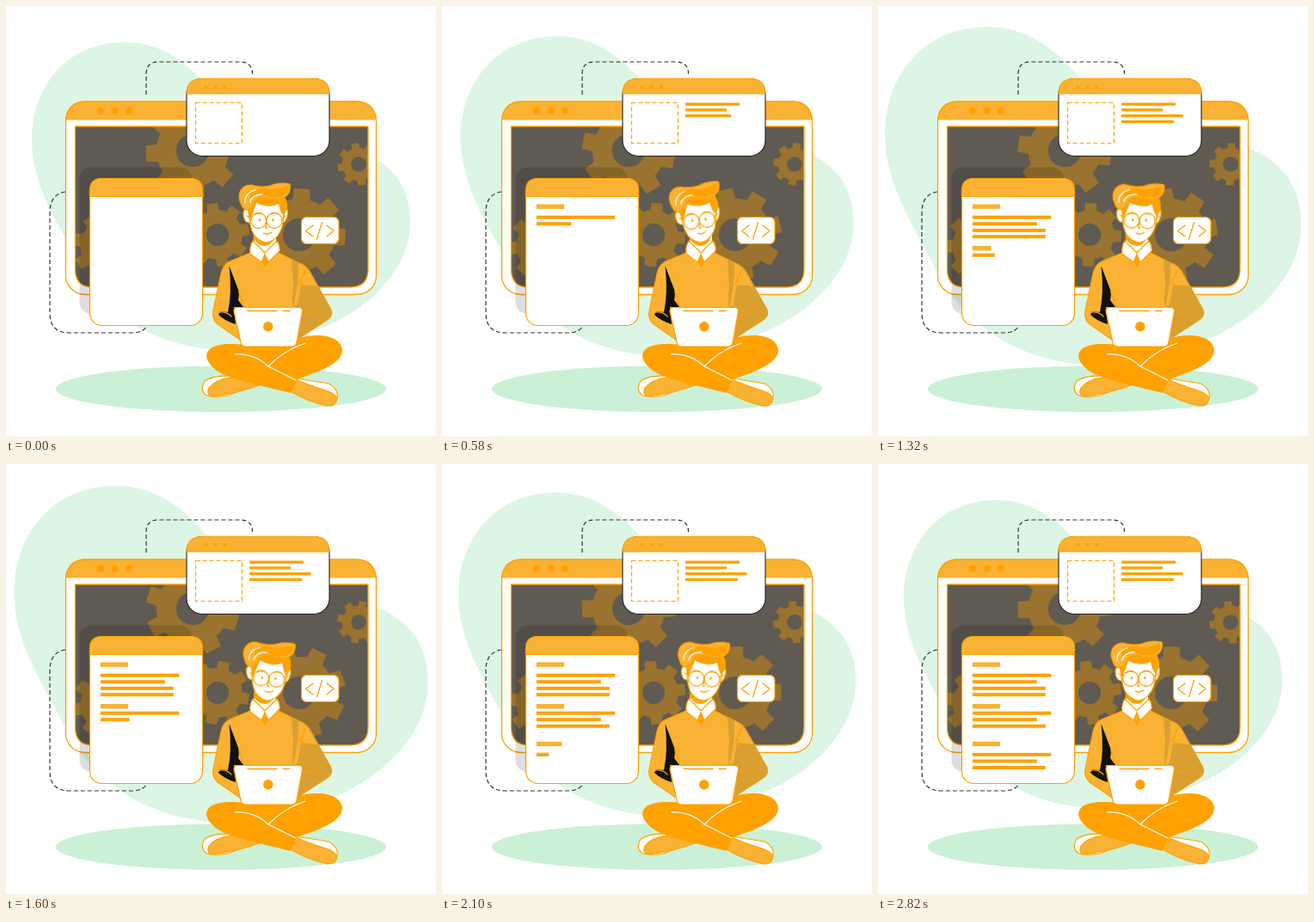
An HTML page for the animation above (2.84 s loop, 500 by 500 pixels).

```html
<!DOCTYPE html>
<html lang="en">
<head>
<meta charset="utf-8">
<title>Developer at work</title>
<style>
  html, body { margin: 0; width: 100%; height: 100%; overflow: hidden; background: #fff; }
  svg { display: block; width: 100vw; height: 100vh; }
  .o { fill: #ffa100; }
  .y { fill: #f9b233; }
  .w { fill: #fff; }
  .d { fill: #d99f31; }
  .line { fill: none; stroke: #ffa100; stroke-width: 1.3; stroke-linecap: round; stroke-linejoin: round; }
  .edge { stroke: #ffa100; stroke-width: 1.2; stroke-linejoin: round; }
  .light { fill: none; stroke: #fff; stroke-width: 1.3; stroke-linecap: round; }
  .dash { fill: none; stroke: #333; stroke-width: 1.2; stroke-dasharray: 5 3; }
  #blob { transform-origin: 250px 220px; animation: swell 2840ms cubic-bezier(.37, 0, .63, 1) infinite; }
  #head { transform-origin: 301px 284px; animation: nod 2840ms cubic-bezier(.37, 0, .63, 1) infinite; }
  .gear { animation: spin 2840ms linear infinite; }
  .back { animation-direction: reverse; }
  .bar { transform-box: fill-box; transform-origin: 0 0; transform: scaleX(0); }
  @keyframes swell { 47.9% { transform: scale(1.1); } }
  @keyframes nod {
    0%, 96% { transform: rotate(0deg); }
    20.5% { transform: rotate(-6.3deg); }
    59.8% { transform: rotate(4.8deg); }
  }
  @keyframes spin { to { transform: rotate(360deg); } }
</style>
</head>
<body>
<svg viewBox="0 0 500 500">
  <defs>
    <clipPath id="screen"><path d="M80.5 140H421V306Q421 327 400 327H101Q80.5 327 80.5 306Z"/></clipPath>
  </defs>

  <path id="blob" fill="#ddf5e4" d="M138 42C70 42 30 95 30 155C30 210 62 255 85 300C110 350 165 398 255 400C310 400 345 385 375 371C415 354 470 310 470 251C470 215 455 191 425 175C380 154 290 150 243 104C215 70 185 42 138 42Z"/>
  <ellipse cx="250" cy="445.3" rx="192" ry="26.8" fill="#caf1d6"/>

  <path class="dash" d="M163 103V79Q163 65 177 65H272Q286.500 65 286.500 79"/>
  <path class="dash" d="M69 216Q51 219 51 240V357Q51 380 74 380H149Q160 379 164 372"/>

  <!-- monitor -->
  <rect class="w" x="69.500" y="111" width="361" height="224.500" rx="22"/>
  <path class="y" d="M69.500 132.500Q70 111 92 111H408Q430 111 430.500 132.500Z"/>
  <rect class="line" x="69.500" y="111" width="361" height="224.500" rx="22"/>
  <g class="o">
    <circle cx="110" cy="121.700" r="4.100"/><circle cx="126.600" cy="121.700" r="4.100"/><circle cx="143" cy="121.700" r="4.100"/>
  </g>
  <g clip-path="url(#screen)">
    <rect x="80" y="139" width="342" height="189" fill="#5f5a52"/>
    <g id="gears" fill="#99732f"></g>
  </g>
  <path class="line" d="M80.500 140H421V306Q421 327 400 327H101Q80.500 327 80.500 306Z"/>
  <rect x="85.500" y="187.500" width="130.500" height="170.500" rx="14" opacity=".13"/>

  <!-- small window -->
  <rect class="w" x="210" y="84.500" width="166" height="90" rx="18" stroke="#222" stroke-width="1.1"/>
  <path class="y edge" d="M210 102Q210 84.500 228 84.500H358Q376 84.500 376 102Z"/>
  <g class="o">
    <circle cx="232.500" cy="94" r="2.200"/><circle cx="243.500" cy="94" r="2.200"/><circle cx="254.500" cy="94" r="2.200"/>
  </g>
  <rect class="line" x="220.500" y="112.500" width="54" height="47" style="stroke-dasharray:5 3;stroke-linecap:butt;stroke-width:1.200"/>

  <!-- document window -->
  <rect class="w edge" x="97.500" y="200.500" width="131" height="171" rx="14"/>
  <path class="y edge" d="M97.500 221.500V214.500Q97.500 200.500 111.500 200.500H214.500Q228.500 200.500 228.500 214.500V221.500Z"/>
  <g id="bars"></g>

  <!-- code tag -->
  <rect class="w edge" x="343.500" y="245.500" width="43.500" height="31" rx="6"/>
  <path class="line" d="M357 255L348.500 261.500L357 268M373 255L381 261.500L373 268M367.500 251.500L361.500 271"/>

  <!-- legs and shoes -->
  <path class="w edge" d="M264 430Q241 429 231 436Q225 446 232 452Q240 456 258 453L290 440Z"/>
  <path class="y edge" d="M262 432Q244 434 236 444Q233 451 238 453.500Q262 453 300 439L285 430Z"/>
  <path class="w edge" d="M337 433L375 439Q387 445 385 456L372 459L330 446Z"/>
  <path class="y edge" d="M337 434Q352 441 372 447Q384 451 385 457Q383 465 374 465Q350 460 331 448Z"/>
  <path class="o" d="M266 393C242 392 230 399 234 411C241 427 262 433 290 440L331 450L338 434C366 425 391 415 391 400C390 384 365 379 340 386L320 396Z"/>
  <path class="light" d="M267 405Q289 404 305 419L337 435M348 392Q322 401 305 419"/>

  <!-- sweater -->
  <path class="y edge" d="M284 287L260 297Q252 301 250 311L241 354Q239 363 246 370L272 388H338L372 366Q381 361 378 353L354 310Q350 302 339 298L317 287Z"/>
  <path class="d" d="M332 294L340 298Q350 302 354 310L378 353Q381 361 372 366L340 387L345 352H334Q332 340 334 325Z"/>
  <path class="y" d="M340 299Q350 303 353 310L362 326L343 324L339 348L334 350Q341 320 340 299Z"/>
  <path class="line" d="M349 306L341 323M343 320L347 329M339 360Q354 359 361 354"/>
  <path fill="#111" d="M259.500 302L269 327Q272 333 270 342L276 350H265L267 370Q254 366 247 359L249 355L258 356Q263 334 259.500 302Z"/>
  <path class="line" d="M248 356Q257 355 262 361M271 333L277 350"/>

  <!-- neck, head, collar -->
  <path class="w" d="M289 262H314V280L301 292L288 280Z"/>
  <path class="o" d="M288 266L313 268Q309 279 301 279Q293 278 288 271Z"/>
  <g id="head">
    <path class="w edge" d="M283 237Q276 234 276 242Q277 253 284 252ZM322 236Q328 233 327.500 242Q326 252 321 252Z"/>
    <path class="w edge" d="M282 228Q282 258 289 267Q296 275 303 275Q312 274 318 264Q324 254 324 226Z"/>
    <path class="o" d="M273 227Q272 236 281 238L284 248L288 238L291 229Q307 236 317 230L319 238L323 245L327 235Q328 227 323 220L284 216Z"/>
    <path class="y edge" d="M276 235Q268 223 273 214Q279 206 289 209Q302 212 313 207Q323 205 330 207Q332 218 323 223Q313 227 301 222Q291 221 288 230Q286 235 281 237Z"/>
    <path class="o" d="M284 217Q291 210 304 213Q317 214 328 208Q330 217 321 221Q311 225 301 220Q290 217 284 226Z"/>
    <path class="light" d="M278 229Q277 218 290 214M284 228Q286 219 298 219"/>
    <circle class="line" cx="293.700" cy="249.500" r="9"/>
    <circle class="line" cx="312" cy="249.500" r="9"/>
    <path class="line" d="M285 247L280 244M320.500 247L325 244M289 243Q293 240 297 242M308 242Q312 239 316 242M303 251L302 258H304M299.500 264Q304 267 309 263"/>
    <ellipse class="o" cx="295" cy="248.800" rx="1.200" ry="1.800"/>
    <ellipse class="o" cx="310.500" cy="248.800" rx="1.200" ry="1.800"/>
  </g>
  <path class="w edge" d="M287 273L301 287L315 273Q319 279 318 285L305 298L301 289L297 298L284 288Q283 279 287 273Z"/>
  <path class="o" d="M301 287L304.500 299L301 304L298 299Z"/>

  <!-- laptop -->
  <path class="w edge" d="M265 355Q265 350.500 270 350.500H340Q345 350.500 344.500 355L338 391Q337 396 332 396H279Q274 396 273 391Z"/>
  <path class="line" d="M281 354.500H315M322 354.500H330"/>
  <circle class="o" cx="304.800" cy="372.700" r="5.700"/>
</svg>
<script>
  const LOOP = 2840;

  function add(parent, name, attrs) {
    const el = document.createElementNS('http://www.w3.org/2000/svg', name);
    for (const key in attrs) el.setAttribute(key, attrs[key]);
    return document.getElementById(parent).appendChild(el);
  }

  // Eight-toothed wheel with a round hole; phase is the angle of one tooth.
  function gearPath(R, phase) {
    const root = R * 0.77, hole = R * 0.35;
    const at = (r, deg) => {
      const a = deg * Math.PI / 180;
      return (r * Math.cos(a)).toFixed(2) + ' ' + (r * Math.sin(a)).toFixed(2);
    };
    let d = '';
    for (let i = 0; i < 8; i++) {
      const a = phase + i * 45;
      d += (i ? `A${root} ${root} 0 0 1 ` : 'M') + at(root, a - 14);
      d += `L${at(R, a - 10)}L${at(R, a + 10)}L${at(root, a + 14)}`;
    }
    d += `A${root} ${root} 0 0 1 ${at(root, phase - 14)}Z`;
    return d + `M${hole} 0A${hole} ${hole} 0 1 0 ${-hole} 0A${hole} ${hole} 0 1 0 ${hole} 0Z`;
  }

  // x, y, radius, phase, class
  [
    [217, 168, 55, -4, 'gear back'],
    [246, 266, 37.5, -55, 'gear back'],
    [341, 266, 54.5, 3, 'gear'],
    [410, 184, 25, -10, 'gear back'],
    [117, 279, 40, 12, 'gear']
  ].forEach(([x, y, R, phase, cls], i) => {
    add('gears', 'g', { id: 'gear' + i, transform: `translate(${x} ${y})` });
    add('gear' + i, 'path', { d: gearPath(R, phase), class: cls, 'fill-rule': 'evenodd' });
  });

  function bar(x, y, width, height, color, start, end) {
    const el = add('bars', 'rect', { x, y, width, height, class: 'bar ' + color });
    el.animate([
      { transform: 'scaleX(0)', offset: 0 },
      { transform: 'scaleX(0)', offset: start / LOOP },
      { transform: 'scaleX(1)', offset: end / LOOP },
      { transform: 'scaleX(1)', offset: 1 }
    ], { duration: LOOP, iterations: Infinity });
  }

  // y, width, start, end
  [
    [112.5, 63, 10, 220], [119.2, 48, 220, 440],
    [126, 71.500, 440, 630], [132.8, 61, 630, 850]
  ].forEach(([y, w, s, e]) => bar(283, y, w, 3.300, 'o', s, e));

  [[230.5, 40, 280], [279, 1200, 1380], [322.8, 1960, 2115]]
    .forEach(([y, s, e]) => bar(109.8, y, 32.300, 5.400, 'y', s, e));

  [
    [243.7, 91.5, 160, 440], [251.3, 75, 440, 700], [258.9, 85, 700, 960], [266.2, 85, 960, 1200],
    [287.7, 91.5, 1250, 1500], [295.2, 75, 1490, 1735], [302.8, 85, 1735, 1990],
    [335.9, 91.5, 2065, 2290], [343.5, 75, 2260, 2460], [351, 85, 2460, 2680]
  ].forEach(([y, w, s, e]) => bar(109.8, y, w, 4, 'o', s, e));

  // One shared clock for every part.
  const now = document.timeline.currentTime || 0;
  document.getAnimations().forEach(a => { a.startTime = now; });
</script>
</body>
</html>
```
